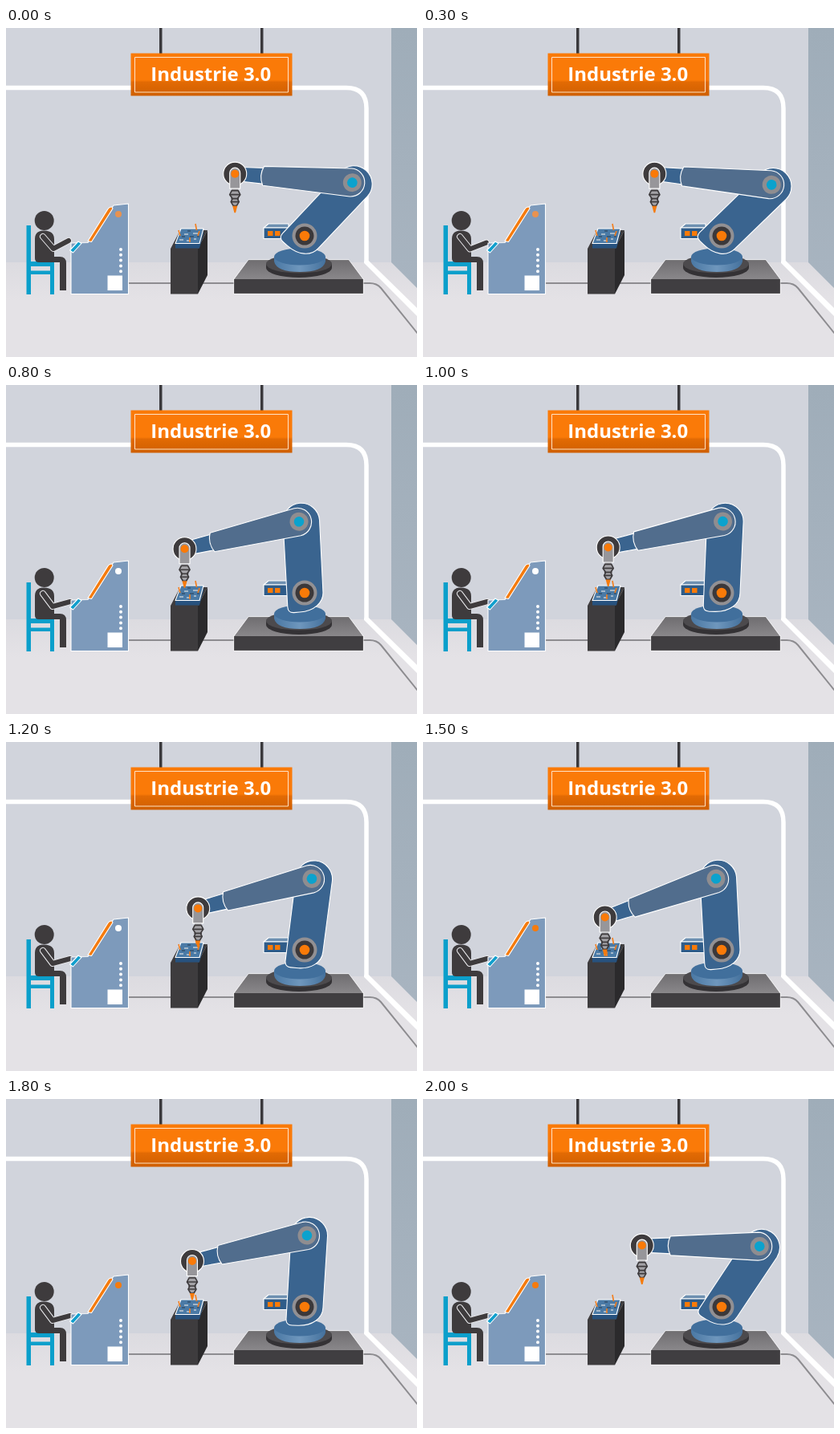
An HTML page for the animation above (2.1 s loop, 512x410 px).

```html
<!DOCTYPE html>
<html lang="de">
<head>
<meta charset="utf-8">
<title>Industrie 3.0</title>
<style>
  html, body { margin: 0; width: 100%; height: 100%; overflow: hidden; }
  svg { display: block; width: 512px; height: 410px; }
  .edge { stroke: #fff; stroke-width: 1.1; stroke-linejoin: round; }
  .round { fill: none; stroke-linecap: round; stroke-linejoin: round; }
</style>
</head>
<body>
<svg viewBox="0 0 512 410">
  <defs>
    <linearGradient id="floor" x2="0" y2="1"><stop stop-color="#dcdbe0"/><stop offset=".4" stop-color="#e4e2e6"/></linearGradient>
    <linearGradient id="side" x2="0" y2="1"><stop stop-color="#9fadb9"/><stop offset="1" stop-color="#a8b4c0"/></linearGradient>
    <linearGradient id="sign" x2="0" y2="1"><stop offset=".63" stop-color="#fa7a08"/><stop offset=".68" stop-color="#e26a04"/><stop offset="1" stop-color="#cf5f00"/></linearGradient>
    <linearGradient id="slab" x2="0" y2="1"><stop stop-color="#6f6d70"/><stop offset="1" stop-color="#8a888b"/></linearGradient>
    <linearGradient id="disc"><stop stop-color="#4a78a4"/><stop offset=".5" stop-color="#6f97bd"/><stop offset="1" stop-color="#44719d"/></linearGradient>
  </defs>

  <!-- room -->
  <path fill="#d1d4dc" d="M0 0H512V410H0z"/>
  <path fill="url(#floor)" d="M0 292H480L512 324V410H0z"/>
  <path fill="url(#side)" d="M480 0H512V324L480 292z"/>
  <path fill="none" stroke="#fff" stroke-width="5.5" d="M0 74.500H424Q449 74.500 449 100V293"/>
  <path fill="#fff" d="M446.2 290H451.8L512 349V359L446.2 293z"/>
  <path fill="none" stroke="#8d8c90" stroke-width="2" d="M152 318H206M240 318H286M445 318H453Q462 318 467 324L513 381"/>

  <!-- sign -->
  <path fill="#3a393c" d="M191 0h3.500v33h-3.500zM317 0h3.500v33h-3.500z"/>
  <path fill="url(#sign)" d="M155.500 31.500H356.500V84.500H155.500z"/>
  <path fill="none" stroke="#ffe3c8" d="M160.500 36.500H351.500V80H160.500z"/>
  <text x="255.200" y="66" text-anchor="middle" fill="#fff" font-family="'Open Sans', 'Noto Sans', sans-serif" font-size="24" font-weight="700">Industrie 3.0</text>

  <!-- chair and operator -->
  <path fill="#0b9fcb" d="M25.500 246h5.500v45h29v41h-5v-25H31v25h-5.500zM31 297v5.500h24v-5.500z"/>
  <g fill="#3e3b3d">
    <circle cx="47.700" cy="240" r="12"/>
    <path d="M36 263Q36 252.500 47 252.500Q60 252.500 60 263V285H67Q75 285 75 293V327H67V292H41Q36 292 36 287z"/>
  </g>
  <path id="armEdge" class="round" stroke="#e9e9ec" stroke-width="8"/>
  <path id="arm" class="round" stroke="#3e3b3d" stroke-width="6"/>

  <!-- console -->
  <path class="edge" fill="#7d9abb" d="M81 268L102 267.500L134 221L152.500 219V331.500H81z"/>
  <path class="edge" fill="#f57b0e" d="M102 265.500L127 225.500Q129 222.500 132 223L133 225L106.500 266.500z"/>
  <path class="edge" fill="#119fcd" d="M79.500 277L90 266L94 268.500L83.500 280z"/>
  <circle id="lamp" cx="140" cy="232" r="4"/>
  <path class="round" stroke="#fff" stroke-width="4" stroke-dasharray="0 6.800" d="M143 276V304"/>
  <path fill="#fff" d="M126.500 308.500h18.500v18.500h-18.500z"/>

  <!-- workpiece on its stand -->
  <path fill="#3e3c3e" d="M205 275L217 252H251L239 275V331.500H205z"/>
  <path fill="#2b2a2c" d="M239 275L251 252V308L239 331.500z"/>
  <path fill="#27527e" d="M211 268H241L246 251V256L241 274.500H211z"/>
  <path class="edge" stroke-width=".7" fill="#4a7aa6" d="M211 268.500L218 250H246L241 268.500z"/>
  <path fill="none" stroke="#a3b7c9" stroke-width="2" d="M216 264h5M225 265h4M222 257h5M233 256h6M234 263h3"/>
  <path fill="none" stroke="#35506d" stroke-width="1.500" d="M219 260h4M229 260h5M238 260h3M226 253h4"/>
  <path fill="none" stroke="#f27d1c" stroke-width="1.600" d="M215 252l2 7M236 244l1.500 8M229 261v6M241 253l-2 6"/>

  <!-- robot base -->
  <path fill="url(#slab)" d="M302 289H427L445 313.500H284z"/>
  <path fill="#403e41" d="M284 313H445V331H284z"/>
  <path fill="none" stroke="#fff" stroke-width=".6" d="M302 288.700H427L445.300 313V331.300H283.700V313z"/>
  <path fill="#343235" d="M324 294V299A41 12 0 0 0 406 299V294z"/>
  <ellipse cx="365" cy="294" rx="41" ry="11.500" fill="#4c4a4d"/>
  <path fill="url(#disc)" d="M334 285V291Q337 304 366 304Q395 304 398 291V285z"/>
  <ellipse cx="366" cy="285" rx="32" ry="10.500" fill="#416f9c"/>
  <path class="edge" fill="#6d8fb0" d="M321 249L327 244H352V249z"/>
  <path class="edge" fill="#2f5c89" d="M321 249H352V262.500H321z"/>
  <path fill="#f97a08" d="M326 253h6.500v6h-6.500zM335 253h6.500v6h-6.500z"/>

  <!-- robot arm -->
  <path id="lower" class="edge" fill="#3a648f" d="M-22.500 16L-20 -89A22.800 22.800 0 0 1 25.600 -89L23 0C23 14 10 23.500 -8 23.500H-15Q-22.500 23.500 -22.500 16z"/>
  <circle cx="372" cy="259" r="15.500" fill="#929093"/>
  <circle cx="372" cy="259" r="11.500" fill="#3b383a"/>
  <circle cx="372" cy="259" r="6.300" fill="#fa7a08"/>
  <g id="upper">
    <path class="edge" fill="#3a648f" d="M-146 -8.500L-110 -10V10L-146 8.500z"/>
    <path class="edge" fill="#516d8d" d="M-111 -12L-2 -17.500A17.500 17.500 0 0 1 -2 17.500L-111 12Q-117 0 -111 -12z"/>
    <circle r="11.500" fill="#8f8d90"/>
    <circle r="6.300" fill="#0ba2cd"/>
  </g>
  <g id="tool">
    <circle class="edge" r="14.500" fill="#3e3b3d"/>
    <path class="edge" stroke-width=".8" fill="#97969a" d="M-6.500 18.500V-1A6.500 6.500 0 0 1 6.500 -1V18.500z"/>
    <circle r="5" fill="#fa7a08"/>
    <path fill="#a3a2a6" d="M-4 19H4L5 30L2 40H-2L-5 30z"/>
    <path class="round" stroke="#3e3b3d" stroke-width="1.700" d="M-4 21H4L6.500 26L3 31L5 35L2 40H-2L-5 35L-3 31L-6.500 26zM-6 26H6M-4 31H4M-4 35H4"/>
    <path fill="#f57b0e" d="M-3 40H3L.8 48.500H-.8z"/>
  </g>
</svg>
<script>
const LOOP = 2100, STEP = 100, DEG = Math.PI / 180;
const SHOULDER = [372, 259], LOWER = 89, UPPER = 146.5;
// time, tilt of the lower arm, dip of the upper arm (degrees)
const poses = [
  [0, 41.8, -4.3], [250, 45, -5.6], [600, 24, 2], [800, -4.5, 13.4],
  [1000, 1, 12.8], [1200, 5.8, 14.6], [1500, -4.5, 19.2],
  [1800, 1.9, 12.6], [2000, 32.1, -0.4]
];
const $ = id => document.getElementById(id);
const place = (id, x, y, turn = 0) =>
  $(id).setAttribute('transform', `translate(${x} ${y}) rotate(${turn})`);

function pose(i) {
  const n = poses.length, turn = Math.floor(i / n), p = poses[i - turn * n];
  return [p[0] + turn * LOOP, p[1], p[2]];
}

const slope = (i, k) => {
  const a = pose(i), b = pose(i + 1);
  return (b[k] - a[k]) / (b[0] - a[0]);
};

// flat at turning points, smooth elsewhere
function tangent(i, k) {
  const a = slope(i - 1, k), b = slope(i, k);
  return a * b > 0 ? 2 * a * b / (a + b) : 0;
}

function angle(t, k) {
  let i = poses.length - 1;
  while (poses[i][0] > t) i--;
  const a = pose(i), b = pose(i + 1), h = b[0] - a[0], u = (t - a[0]) / h, v = 1 - u;
  return v * v * (1 + 2 * u) * a[k] + u * u * (1 + 2 * v) * b[k]
    + h * u * v * (v * tangent(i, k) - u * tangent(i + 1, k));
}

function draw(t) {
  const tilt = angle(t, 1), dip = angle(t, 2);
  const x = SHOULDER[0] + LOWER * Math.sin(tilt * DEG);
  const y = SHOULDER[1] - LOWER * Math.cos(tilt * DEG);
  place('lower', ...SHOULDER, tilt);
  place('upper', x, y, -dip);
  place('tool', x - UPPER * Math.cos(dip * DEG), y + UPPER * Math.sin(dip * DEG));

  const lift = t < 600 ? Math.cos(Math.PI * t / 400) ** 2 : 0;
  const arm = `M46 260L${58 + lift} ${276 - lift}L${80 - 2 * lift} ${270 - 5 * lift}`;
  $('arm').setAttribute('d', arm);
  $('armEdge').setAttribute('d', arm);

  const lamp = t < 700 ? '#e8924f' : t < 1300 ? '#fff' : '#f57b0e';
  $('lamp').setAttribute('fill', lamp);
}

const start = performance.now();
function tick() {
  const t = (performance.now() - start) % LOOP;
  draw(Math.floor(t / STEP) * STEP);
  requestAnimationFrame(tick);
}
tick();
</script>
</body>
</html>
```
